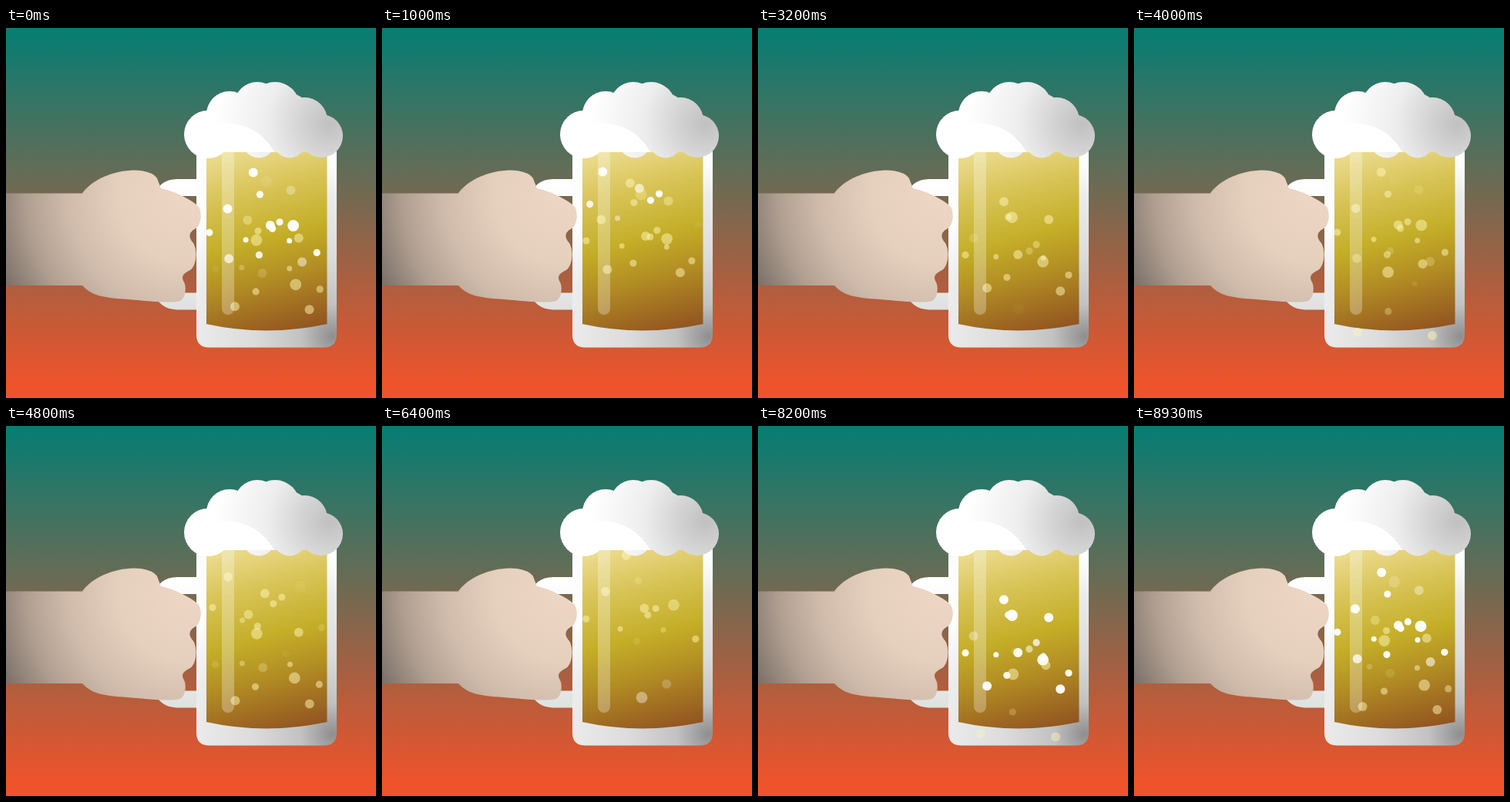
These frames come from a looping animation (480 px wide and 480 px high, 8.99 s). An HTML page:

```html
<!DOCTYPE html>
<html lang="en">
<head>
<meta charset="utf-8">
<title>Beer mug</title>
<style>
  html, body { margin: 0; width: 100%; height: 100%; overflow: hidden; }
  svg { display: block; width: 100%; height: 100%; }
</style>
</head>
<body>
<svg viewBox="0 0 480 480">
  <defs>
    <linearGradient id="sky" x2="0" y2="1">
      <stop offset=".02" stop-color="#0a7c72"/>
      <stop offset=".96" stop-color="#ee532b"/>
    </linearGradient>
    <radialGradient id="skin" gradientUnits="userSpaceOnUse" cx="235" cy="215" r="260">
      <stop offset="0" stop-color="#eed7c4"/>
      <stop offset=".35" stop-color="#e5cfbd"/>
      <stop offset=".6" stop-color="#d0bbab"/>
      <stop offset=".8" stop-color="#b09f91"/>
      <stop offset="1" stop-color="#7d726a"/>
    </radialGradient>
    <linearGradient id="handle" gradientUnits="userSpaceOnUse" x1="0" y1="200" x2="0" y2="365">
      <stop offset="0" stop-color="#fff"/>
      <stop offset="1" stop-color="#dfe2e0"/>
    </linearGradient>
    <radialGradient id="glass" gradientUnits="userSpaceOnUse" cx="424" cy="400" r="260">
      <stop offset="0" stop-color="#8e8e8e"/>
      <stop offset=".16" stop-color="#c2c2c2"/>
      <stop offset=".4" stop-color="#dcdcdc"/>
      <stop offset=".7" stop-color="#ececec"/>
      <stop offset=".85" stop-color="#fdfdfd"/>
    </radialGradient>
    <linearGradient id="beer" gradientUnits="userSpaceOnUse" x1="300" y1="150" x2="365" y2="400">
      <stop offset="0" stop-color="#eedf96"/>
      <stop offset=".24" stop-color="#d9c559"/>
      <stop offset=".5" stop-color="#c4ae28"/>
      <stop offset=".7" stop-color="#b28d24"/>
      <stop offset="1" stop-color="#915220"/>
    </linearGradient>
    <radialGradient id="foam" gradientUnits="userSpaceOnUse" cx="420" cy="124" r="150">
      <stop offset="0" stop-color="#c0c0c0"/>
      <stop offset=".25" stop-color="#d4d4d4"/>
      <stop offset=".55" stop-color="#eee"/>
      <stop offset="1" stop-color="#fff"/>
    </radialGradient>
  </defs>

  <rect width="480" height="480" fill="url(#sky)"/>
  <path d="M252 207H222Q206 207 203 222V340Q206 354 222 354.500H252" fill="none" stroke="url(#handle)" stroke-width="22"/>
  <path d="M247 140H429V398Q429 414.500 412 414.500H264Q247 414.500 247 398Z" fill="url(#glass)"/>
  <path d="M260 140H416.500V384Q338 401 260 384Z" fill="url(#beer)"/>
  <path d="M0 214.500H99C112 196 140 185 166 184.500Q189 185 196 195L201 208C218 211 243 224 250 232
    C255 241 253 256 246 260C235 266 238 273 243 279C249 289 247 309 239 314
    C225 321 229 325 232 332C234 341 232 350 226 354C214 357 190 355 158 352C125 350 111 347 99 334H0Z" fill="url(#skin)"/>
  <g id="bubbles"></g>
  <path d="M280 150H296V364A8 8 0 0 1 280 364Z" fill="#fff" opacity=".28"/>

  <g fill="url(#foam)">
    <circle cx="262" cy="138" r="31"/>
    <circle cx="290" cy="112" r="30"/>
    <circle cx="326" cy="100" r="30"/>
    <circle cx="349" cy="102" r="32"/>
    <circle cx="365" cy="116" r="32"/>
    <circle cx="387" cy="120" r="30"/>
    <circle cx="409" cy="140" r="28"/>
    <path d="M262 110H405V161H262Z"/>
    <ellipse cx="328" cy="147" rx="21" ry="21.500"/>
    <ellipse cx="368" cy="147" rx="21" ry="21.500"/>
  </g>
  <path d="M245 128Q320 110 348 161H258Z" fill="#fff"/>
</svg>
<script>
const LOOP = 8.99, FPS = 15;
const LIFE = 2.9, FADE = 0.6, SPAWN_GAP = 0.122;

const gold = { color: '#fff8b8', strength: 0.5 };
const white = { color: '#fff', strength: 0.95 };
const waves = [
  { start: 1.15, ...gold },
  { start: 3.15, ...gold },
  { start: 6.15, ...white },
  { start: 7.44, ...gold },
];

// Neighbouring sizes sway in opposite directions.
const sizes = {
  L: { r: 7.4, side: -1 },
  M: { r: 6, side: 1 },
  S: { r: 4.6, side: -1 },
  T: { r: 3.5, side: 1 },
};

// Size and birthplace, in order of birth.
const spawns = `L338,367 M369,341 M383,428 M287,418 S331,381 S333,298 T364,335 L382,374
  S410,360 M311,271 T305,320 M332,328 S272,316 S363,298 S353,302 M279,283`.split(/\s+/);

const layer = document.getElementById('bubbles');

function makeBubble(wave, spawn, order) {
  const [x, y] = spawn.slice(1).split(',').map(Number);
  const node = document.createElementNS(layer.namespaceURI, 'circle');
  const size = sizes[spawn[0]];
  node.setAttribute('r', size.r);
  node.setAttribute('fill', wave.color);
  layer.append(node);
  return { node, x, y, ...size, strength: wave.strength, birth: wave.start + order * SPAWN_GAP };
}

const bubbles = waves.flatMap(wave => spawns.map((spawn, i) => makeBubble(wave, spawn, i)));

function draw(time) {
  for (const { node, x, y, r, side, strength, birth } of bubbles) {
    const age = (time - birth + 2 * LOOP) % LOOP;
    const alpha = Math.max(0, Math.min(1, age / FADE, (LIFE - age) / FADE));
    const sway = 0.9 * r * (1 - Math.cos(2 * Math.PI * age / LIFE));
    node.setAttribute('cx', x + side * sway);
    node.setAttribute('cy', y - 8 * r * age);
    node.setAttribute('opacity', alpha * strength);
  }
}

const start = performance.now();
function tick() {
  const time = (performance.now() - start) / 1000 % LOOP;
  draw(Math.floor((time + 0.004) * FPS) / FPS);
  requestAnimationFrame(tick);
}
tick();
</script>
</body>
</html>
```
